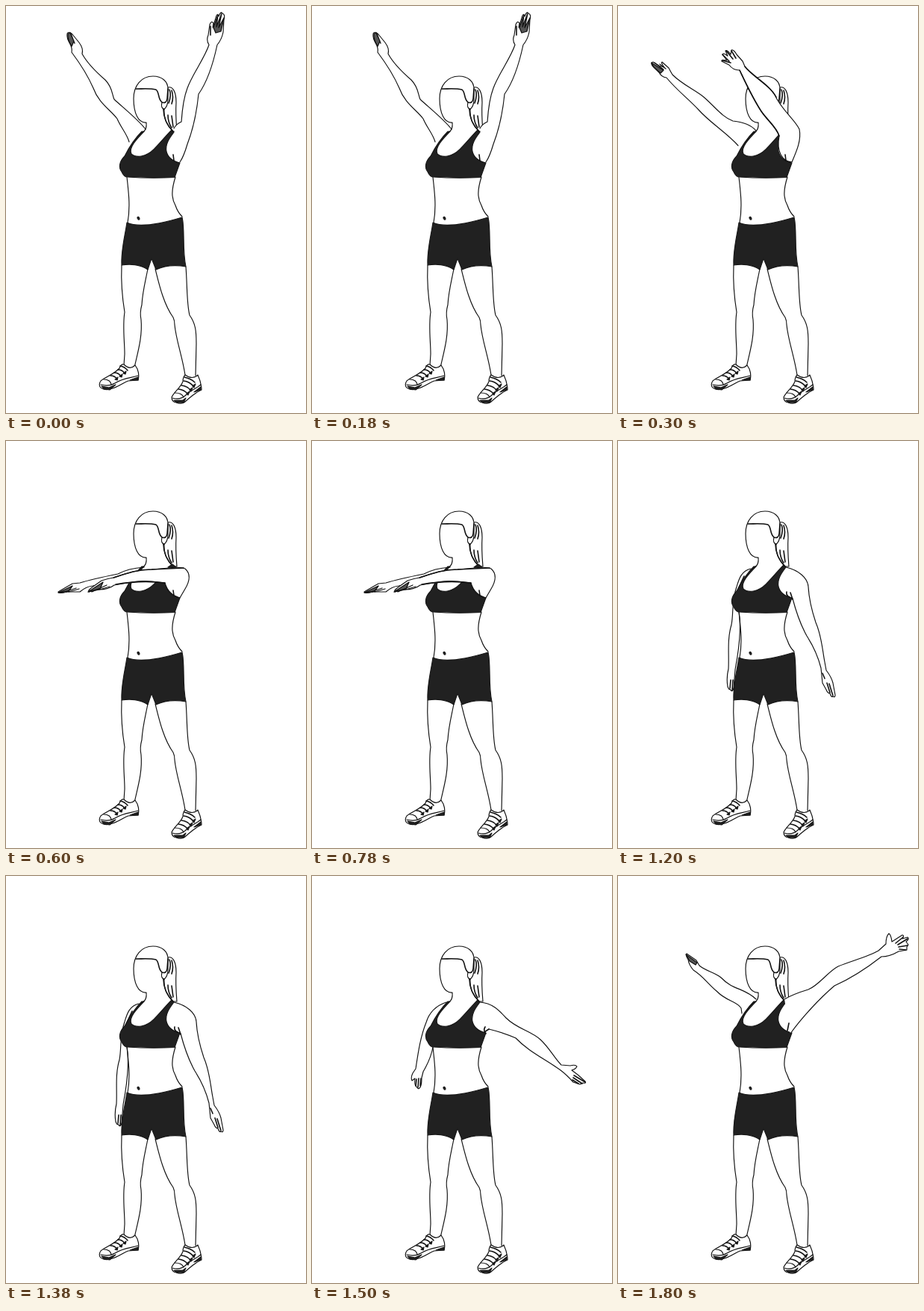
An HTML page that plays this animation: 402x545 px, repeating every 2.1 s.

```html
<!DOCTYPE html>
<html lang="en">
<head>
<meta charset="utf-8">
<title>Arm circles</title>
<style>
html, body { margin: 0; width: 100%; height: 100%; overflow: hidden; background: #fff }
svg { display: block; width: 100%; height: 100% }
path { fill: none; stroke: #111; stroke-width: 1.15; stroke-linejoin: round; stroke-linecap: round }
.skin { fill: #fff }
.bold { stroke-width: 1.6 }
.dark { fill: #212121; stroke: #161616 }
.tips { fill: #555; stroke-width: 1.3 }
.far, .near { display: none }
.on { display: inline }
</style>
</head>
<body>
<svg viewBox="0 0 402 545">
  <!-- far arms, one per pose -->
  <g class="far">
    <path class="skin" d="M187 165C178 153 158 137 145 125C142 119 143 109 133 99C118 86 108 75 102 64Q104 57 98 49L89 38Q84 33 82 37Q81 43 86 51Q89 57 88 62C100 78 110 94 117 110C124 130 140 139 149 151C154 163 162 171 165 182"/>
    <path class="tips" d="M83 37Q82 45 88 54L91 47L86 36ZM87 37L92 50"/>
  </g>
  <g class="far">
    <path class="skin" d="M185 167C178 159 169 156 154 154C140 149 130 135 115 122C104 113 86 105 73 92Q70 87 68 83L59 75Q57 76 62 82L55 80L47 75Q43 75 46 80L55 89Q58 95 65 96C79 113 94 124 108 139C124 157 145 169 161 187"/>
    <path class="tips" d="M45 76L61 86L57 90L48 82ZM49 76L61 85M56 78L64 84"/>
  </g>
  <g class="far">
    <path class="skin" d="M185 169C172 170 161 172 150 178C135 181 115 185 99 190L89 191Q80 196 70 202Q71 205 83 202L99 202Q107 195 116 194L165 186"/>
    <path class="tips" d="M70 203L89 194L84 201ZM76 203L94 197M84 202L98 198"/>
  </g>
  <g class="far">
    <path class="skin" d="M178 171C165 174 157 184 151 198C145 218 137 232 130 248C123 263 119 282 115 293Q109 300 109 322Q111 328 112 324Q113 332 116 327Q119 325 119 314L124 300L125 296C136 279 145 268 150 255C156 246 160 236 161 229"/>
    <path d="M112 324L114 309M115 327L117 311M110 316L112 306"/>
  </g>
  <g class="far">
    <path class="skin" d="M178 171C165 174 162 185 159 195C152 215 155 230 152 246C146 266 149 285 148 305Q145 317 147 329Q149 334 150 332Q153 338 155 331L157 306C161 285 166 252 162 228"/>
    <path class="bold" d="M150 331L151 320M153 334L154 320M162 196L169 181"/>
  </g>
  <g class="far">
    <path class="skin" d="M180 169C165 174 157 183 153 196C145 216 142 238 139 258L135 264Q132 270 134 274L138 271Q137 281 140 282Q142 286 144 284Q147 282 147 270L149 262C156 250 160 241 162 229"/>
    <path class="bold" d="M139 281L140 272M142 283L143 271M145 281L146 271"/>
  </g>
  <g class="far">
    <path class="skin" d="M185 165C170 150 154 153 138 136C130 129 119 128 109 120L105 113L92 104Q90 106 94 112Q95 119 101 126C114 134 120 144 132 154C145 168 159 167 165 177L166 184"/>
    <path class="tips" d="M91 105L106 116L104 119L96 114Z"/>
  </g>

  <!-- legs and waist -->
  <path d="M162 229C164 248 167 268 163 290M227 229C221 248 222 258 227 267Q230 276 236 282"/>
  <path d="M155 347C154 370 156 392 159 410C156 428 159 450 159 466L158 481M190 352C187 368 183 382 182 400Q179 411 181 420C183 442 177 462 172 484"/>
  <path d="M200 352C205 372 211 399 224 417Q226 421 226 427C228 448 236 468 240 494M241 349C243 375 242 398 246 414C254 425 255 435 255 452L254 495"/>
  <path class="dark" d="M162 290C178 297 203 293 236 283C240 300 236 326 241 349C225 346 212 348 201 353L195 338L190 353C180 346 166 345 155 347C154 328 159 310 162 290Z"/>
  <path class="dark" d="M176 283Q178 281 179 285Q178 288 176 284Z"/>

  <!-- shoes -->
  <path class="skin" d="M158 480Q154 479 152 485C145 493 133 497 127 502Q124 506 126 510Q130 515 139 513C150 511 157 504 164 502L177 501Q179 494 176 486L173 481Q166 488 158 480Z"/>
  <path d="M127 507Q138 510 146 505C157 498 168 498 177 495M131 500Q140 500 141 507"/>
  <path class="bold" d="M153 482Q159 483 163 488M150 487Q156 487 159 492M145 491Q151 491 154 496M140 495Q146 495 149 500"/>
  <path class="dark" d="M128 509L138 511L147 507L139 514L131 513ZM166 501L177 497L177 501Z"/>
  <path class="dark" d="M157 492L161 489L160 493ZM152 496L156 493L155 497ZM146 500L150 497L149 501Z"/>
  <path class="skin" d="M240 494Q237 497 237 503C234 511 225 517 222 524Q222 530 228 531Q236 534 241 529C248 523 253 518 262 514Q262 505 257 494Q250 501 240 494Z"/>
  <path d="M223 525Q234 528 241 521C249 513 256 512 261 507M226 518Q236 518 238 524"/>
  <path class="bold" d="M239 497Q248 499 253 504M238 502Q246 503 251 509M235 508Q243 509 247 514M231 513Q239 514 243 519"/>
  <path class="dark" d="M225 528L237 528L241 525L238 531L229 531ZM252 517L261 510L261 514Z"/>
  <path class="dark" d="M250 509L254 506L252 511ZM246 514L250 511L248 516ZM242 519L246 516L244 521Z"/>

  <!-- top -->
  <path class="dark" d="M182 168C173 177 165 189 159 201C151 209 151 217 155 222Q158 229 163 229C185 230.500 205 230.500 226 229.500L233 210C224 208 217 203 215 195C213 185 219 177 225 169L222 166C214 174 206 184 198 192C188 202 174 204 168 198C164 190 175 178 185 168Z"/>

  <!-- head and hair -->
  <path class="skin" d="M217 109C224 107 228 116 228 129C227 145 228 156 229 168L224 168C216 160 211 152 212 137Z"/>
  <path class="skin" d="M183 169Q189 166 188 156C177 157 171 143 171 124C171 107 181 94 197 94C209 94 217 101 217 111L217 125Q217 135 211 139"/>
  <path class="bold" d="M174 111C184 111 193 110 201 112C206 116 203 124 209 129Q215 131 216 124L217 111M211 138C211 149 214 158 224 168M219 112Q222 119 218 130M222 113Q225 122 222 131M217 146Q217 156 222 163M222 147L224 162"/>
  <path d="M209 129Q207 137 212 138"/>

  <!-- near arms, one per pose -->
  <g class="near">
    <path class="skin" d="M225 164Q228 158 235 155C236 140 238 123 243 110C250 91 266 70 272 52Q268 46 271 39L273 25Q275 19 278 23L277 29L282 13Q284 9 285 14Q288 6 290 10Q294 11 292 18L291 35Q289 45 283 52C277 80 270 101 258 118C255 148 250 167 243 185Q238 202 233 209"/>
    <path class="tips" d="M278 29L284 12L282 28L289 10L285 29L292 16L288 34L281 36Z"/>
    <path class="bold" d="M224 199L225 207M274 27L274 39"/>
  </g>
  <g class="near">
    <path class="skin" d="M216 174C212 162 198 152 190 138C180 121 171 103 163 86Q154 86 149 79L139 74Q138 71 146 73L140 65Q141 62 147 67L144 60Q146 58 151 65L152 59Q155 58 159 65L167 74L170 81C180 95 202 105 210 119C219 139 237 152 243 165C246 180 239 195 233 209C220 208 212 195 216 174Z"/>
    <path class="bold" d="M170 81C180 94 203 105 212 122M163 86C172 105 180 123 192 141C201 154 212 161 216 174M140 65L149 74M145 60L154 71M152 60L158 70M140 73L151 76M224 199L225 207"/>
  </g>
  <g class="near">
    <path class="dark" d="M217 169L223 165L229 170Z"/>
    <path class="skin" d="M213 190C195 188 181 186 168 189L145 193Q137 199 125 199L111 202Q109 200 118 194L128 187Q137 184 144 183C162 177 176 172 195 172C215 171 231 167 240 171C248 178 246 188 240 198L233 210C222 207 216 201 213 190Z"/>
    <path class="tips" d="M110 202L130 189L126 198ZM115 202L135 193M125 199L139 195"/>
    <path class="bold" d="M144 183C162 177 176 172 195 172L238 170M147 192C170 188 190 187 213 190M224 200L225 207"/>
  </g>
  <g class="near">
    <path class="skin" d="M225 169C239 173 247 183 246 194C245 216 234 225 230 237C223 265 213 290 209 313L207 326Q207 340 204 346Q201 350 200 345Q197 351 194 346Q190 348 190 340L192 327L188 334Q184 336 184 330Q188 318 195 312C197 296 199 279 199 260C201 236 212 221 221 204"/>
    <path class="bold" d="M221 203C212 221 201 236 199 260L196 310M220 193Q216 199 221 203M195 346L197 330M200 345L202 331M191 341L193 328"/>
  </g>
  <g class="near">
    <path class="skin" d="M225 169C242 173 254 183 255 195C256 215 261 231 265 243C273 261 274 281 277 296L279 307Q286 316 288 324L291 340Q291 344 288 342Q286 344 284 338Q281 338 279 333L274 324L272 304C268 288 262 275 253 261C244 245 239 230 234 211"/>
    <path class="bold" d="M226 202Q225 207 230 209M231 203L234 212M288 341L283 325M284 337L280 324M274 311L277 318"/>
  </g>
  <g class="near">
    <path class="skin" d="M225 169C241 170 250 179 260 190C275 205 293 207 306 219C318 230 325 244 334 253L346 254Q353 252 355 255Q353 259 348 260L356 266L366 275Q368 278 363 277L359 279L350 276Q341 266 333 260C312 245 290 235 273 217C262 212 249 208 237 205"/>
    <path class="bold" d="M366 276L351 267M362 278L350 270M357 278L349 273M232 202Q229 207 233 211M237 205L231 209"/>
  </g>
  <g class="near">
    <path class="skin" d="M223 165C235 158 245 155 255 152C270 146 280 129 295 121C315 113 335 108 349 100L359 91Q359 81 363 77Q366 79 367 88L381 79Q384 79 381 84L388 82Q391 84 386 88L389 92L387 95L387 99L376 101Q364 108 353 108C335 122 315 136 290 147C270 164 246 190 231 211"/>
    <path class="bold" d="M382 82L372 90M388 84L375 92M388 93L376 95M386 99L377 98M229 197L227 207"/>
  </g>
</svg>
<script>
const hold = 300, poses = 7;
const arms = ['.far', '.near'].map(s => [...document.querySelectorAll(s)]);

function draw(now) {
  const pose = Math.floor(now / hold) % poses;
  for (const set of arms) set.forEach((arm, i) => arm.classList.toggle('on', i === pose));
  requestAnimationFrame(draw);
}
draw(performance.now());
</script>
</body>
</html>
```
